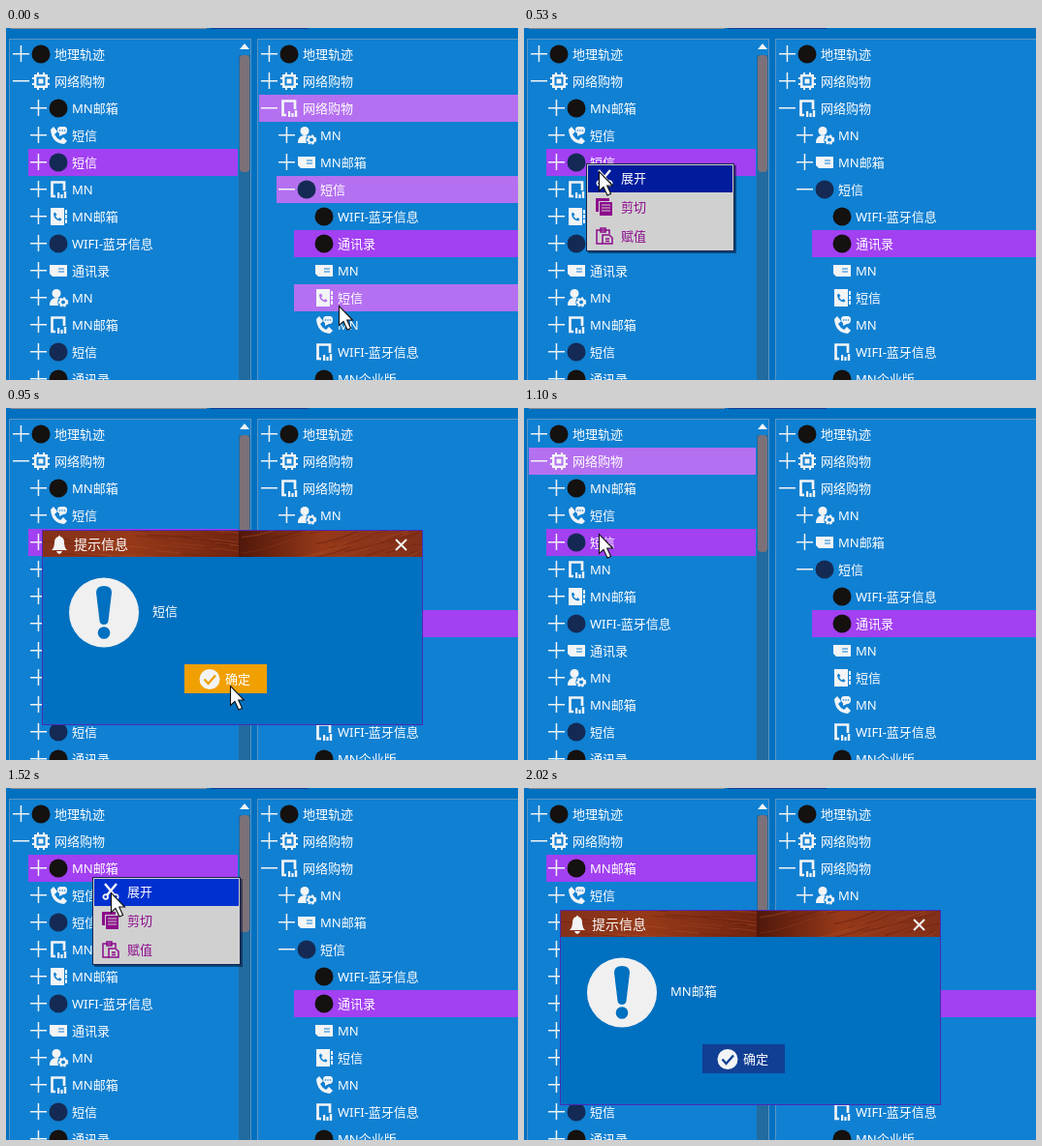
An HTML page with a canvas for the animation above (2140 ms loop, 528x364 px).

```html
<!DOCTYPE html>
<html lang="zh-CN">
<head>
<meta charset="utf-8">
<title>树形列表</title>
<style>
html, body { margin: 0; width: 528px; height: 364px; overflow: hidden; background: #0070c0; }
canvas { display: block; }
</style>
</head>
<body>
<canvas id="stage" width="528" height="364"></canvas>
<script>
const g = document.getElementById('stage').getContext('2d');
const LOOP = 2140;
const FONT = '"Noto Sans", "Noto Sans CJK SC", "Noto Sans CJK", sans-serif';
const HOVER = '#b470f0', PICKED = '#a240f2', WHITE = '#f2f4f6', BODY = '#0070c0', PANEL = '#1080d2';
const EDGE = '#5a94c4';

// Each row: depth, expander, icon, label
const leftRows = [
  [0, '+', 'black', '地理轨迹'], [0, '-', 'chip', '网络购物'],
  [1, '+', 'black', 'MN邮箱'], [1, '+', 'call', '短信'],
  [1, '+', 'navy', '短信'], [1, '+', 'screen', 'MN'],
  [1, '+', 'book', 'MN邮箱'], [1, '+', 'navy', 'WIFI-蓝牙信息'],
  [1, '+', 'card', '通讯录'], [1, '+', 'user', 'MN'],
  [1, '+', 'screen', 'MN邮箱'], [1, '+', 'navy', '短信'],
  [1, '+', 'black', '通讯录']
];
const rightRows = [
  [0, '+', 'black', '地理轨迹'], [0, '+', 'chip', '网络购物'],
  [0, '-', 'screen', '网络购物'], [1, '+', 'user', 'MN'],
  [1, '+', 'card', 'MN邮箱'], [1, '-', 'navy', '短信'],
  [2, '', 'black', 'WIFI-蓝牙信息'], [2, '', 'black', '通讯录'],
  [2, '', 'card', 'MN'], [2, '', 'book', '短信'],
  [2, '', 'call', 'MN'], [2, '', 'screen', 'WIFI-蓝牙信息'],
  [2, '', 'black', 'MN企业版']
];

// t: start, at: pointer tip, pick: selected left row
const steps = [
  { t: 0, at: [343, 287], pick: 4 },
  { t: 100, at: [302, 262], pick: 4 },
  { t: 200, at: [192, 204], pick: 4 },
  { t: 300, at: [92, 152], pick: 4 },
  { t: 400, at: [64, 140], pick: 4 },
  { t: 430, at: [66, 142], pick: 4, menu: [64, 140, '#001c9c'] },
  { t: 530, at: [77, 148], pick: 4, menu: [64, 140, '#001c9c'] },
  { t: 630, at: [80, 152], pick: 4, menu: [64, 140, '#0030d0'] },
  { t: 700, at: [86, 160], pick: 4, dialog: '短信' },
  { t: 760, at: [165, 230], pick: 4, dialog: '短信' },
  { t: 830, at: [233, 289], pick: 4, dialog: '短信' },
  { t: 930, at: [231, 287], pick: 4, dialog: '短信' },
  { t: 1000, at: [206, 256], pick: 4 },
  { t: 1030, at: [130, 186], pick: 4 },
  { t: 1100, at: [77, 130], pick: 4 },
  { t: 1200, at: [84, 104], pick: 4 },
  { t: 1300, at: [89, 92], pick: 2 },
  { t: 1400, at: [93, 97], pick: 2, menu: [89, 92, '#0030d0'] },
  { t: 1520, at: [108, 108], pick: 2, menu: [89, 92, '#0030d0'] },
  { t: 1620, at: [109, 110], pick: 2, menu: [89, 92, '#0030d0'] },
  { t: 1720, at: [109, 110], pick: 2, dialog: 'MN邮箱' },
  { t: 2020, at: null, pick: 2, dialog: 'MN邮箱' }
];

function box(x, y, w, h, color) {
  g.fillStyle = color;
  g.fillRect(x, y, w, h);
}
function frame(x, y, w, h, color) {
  g.strokeStyle = color;
  g.lineWidth = 1;
  g.strokeRect(x + .5, y + .5, w - 1, h - 1);
}
function disc(x, y, r, color) {
  g.fillStyle = color;
  g.beginPath();
  g.arc(x, y, r, 0, 7);
  g.fill();
}
function fill(d, color) {
  g.fillStyle = color;
  g.fill(new Path2D(d));
}
function line(d, color, width) {
  g.strokeStyle = color;
  g.lineWidth = width;
  g.stroke(new Path2D(d));
}
function text(s, x, y, color = '#fff', size = 13) {
  g.font = size + 'px ' + FONT;
  g.fillStyle = color;
  g.fillText(s, x, y + 5);
}
function place(x, y, draw) {
  g.save();
  g.translate(x, y);
  draw();
  g.restore();
}
function inside(p, x, y, w, h) {
  return p && p[0] >= x && p[0] < x + w && p[1] >= y && p[1] < y + h;
}

const HANDSET = 'M-8-6L-5-9L-1-4L-4-1Q-2 3 2 5L5 2L9 6L6 9Q-7 8-8-6Z';
const icons = {
  black() { disc(0, 0, 9.5, '#15110f'); },
  navy() { disc(0, 0, 9.5, '#142a54'); },
  chip(bg) {
    line('M-3-9V9M3-9V9M-9-3H9M-9 3H9', WHITE, 2);
    box(-7, -7, 14, 14, WHITE);
    box(-4.5, -4.5, 9, 9, bg);
    box(-2.5, -2.5, 5, 5, WHITE);
  },
  call(bg) {
    fill(HANDSET, WHITE);
    fill('M2-9H6Q9-9 9-5.5Q9-1 5-1L1 1V-2Q-1-3-1-5.5Q-1-9 2-9Z', WHITE);
    for (const x of [1.5, 4, 6.5]) disc(x, -5, .8, bg);
  },
  screen() {
    line('M-3 7H-6.5V-7.5H6V1', WHITE, 2.7);
    box(-1, 3, 2.2, 6, WHITE);
    box(2.4, 5, 2.2, 4, WHITE);
    box(5.8, 2, 2.4, 7, WHITE);
  },
  book(bg) {
    box(-8, -9, 14, 18, WHITE);
    for (const y of [-7, -2, 3]) box(7, y, 2, 4, WHITE);
    g.scale(.5, .5);
    g.translate(-2, 0);
    fill(HANDSET, bg);
  },
  card(bg) {
    fill('M-9-6H9V6H-6L-9 3Z', WHITE);
    line('M0-2H6M0 1H6', bg, 1);
  },
  user(bg) {
    disc(-2, -4.5, 4.5, WHITE);
    fill('M-9 8Q-9 0-2 0Q2 0 4 3V8Z', WHITE);
    disc(5, 4.5, 5.8, bg);
    g.setLineDash([2, 1.7]);
    line('M9 4.5A4 4 0 1 1 1 4.5A4 4 0 1 1 9 4.5', WHITE, 2.4);
    g.setLineDash([]);
    line('M8 4.5A3 3 0 1 1 2 4.5A3 3 0 1 1 8 4.5', WHITE, 2);
  }
};

function tree(rows, x, right, picked, hovered) {
  const lit = new Set();
  for (let i = hovered, depth = 9; i >= 0; i--) {
    if (rows[i][0] < depth) { lit.add(i); depth = rows[i][0]; }
  }
  rows.forEach(([depth, sign, icon, label], i) => {
    const left = x + depth * 18, y = 27 + i * 28;
    const bg = i === picked ? PICKED : lit.has(i) ? HOVER : PANEL;
    if (bg !== PANEL) box(left, y - 14, right - left, 28, bg);
    if (sign) box(left + 2, y - 1, 17, 1.5, WHITE);
    if (sign === '+') box(left + 9.7, y - 9, 1.5, 17, WHITE);
    place(left + 31, y, () => icons[icon](bg));
    text(label, left + 45, y);
  });
}

function rowAt(p, rows, x, right) {
  if (!p) return -1;
  const i = Math.floor((p[1] - 13) / 28);
  return rows[i] && inside(p, x + rows[i][0] * 18, 13, right - x - rows[i][0] * 18, 364) ? i : -1;
}

function scrollbar() {
  box(240, 28, 12, 336, '#216b9f');
  fill('M246 16L251 22H241Z', WHITE);
  g.beginPath();
  g.roundRect(241, 28, 10, 121, 4);
  g.fillStyle = '#7c7178';
  g.fill();
}

function menu([x, y, color]) {
  const ink = '#8c0a8c', paper = '#d0d0d0';
  box(x + 2, y + 2, 153, 91, 'rgba(0,10,40,.5)');
  box(x, y, 153, 91, paper);
  frame(x, y, 153, 91, '#17244e');
  box(x + 2, y + 2, 149, 28, color);
  ['展开', '剪切', '赋值'].forEach((s, i) => text(s, x + 36, y + 15 + i * 30, i ? ink : '#fff'));
  place(x + 19, y + 15, () => {
    line('M-6-8L4 4M6-8L-4 4', WHITE, 2.5);
    line('M-3 5.5A2.3 2.3 0 1 1-7.6 5.5A2.3 2.3 0 1 1-3 5.5M7.6 5.5A2.3 2.3 0 1 1 3 5.5A2.3 2.3 0 1 1 7.6 5.5', WHITE, 1.8);
  });
  place(x + 19, y + 45, () => {
    box(-9, -9, 14, 14, ink);
    box(-6, -6, 15, 15, paper);
    box(-5, -5, 13, 14, ink);
    line('M-3-2H6M-3 1H6M-3 4H6', paper, 1);
  });
  place(x + 19, y + 75, () => {
    line('M-2 8H-8V-6H5V-2M-4-8H1V-4H-4Z', ink, 1.5);
    line('M-2-1H5L8 2V8H-2ZM1 3H5M1 5.5H5', ink, 1.5);
  });
}

function wood() {
  let seed = 11;
  const rnd = () => (seed = seed * 16807 % 2147483647) / 2147483647;
  const tones = ['#59190c', '#a64524', '#6d2110', '#b0522c'];
  g.save();
  g.beginPath();
  g.rect(38, 127, 391, 27);
  g.clip();
  for (const [x, w, tilt] of [[38, 202, -5], [240, 189, 18]]) {
    const shade = g.createLinearGradient(x, 0, x + w, 0);
    shade.addColorStop(0, tilt < 0 ? '#84301a' : '#4f170b');
    shade.addColorStop(.45, '#963919');
    shade.addColorStop(1, tilt < 0 ? '#702410' : '#82301a');
    box(x, 127, w, 27, shade);
    g.globalAlpha = .38;
    for (let i = 0; i < 34; i++) {
      const a = x + rnd() * w, y = 122 + rnd() * 36, n = 25 + rnd() * 40;
      const end = Math.min(a + n, x + w);
      line(`M${a} ${y}Q${a + n / 2} ${y - tilt * .2} ${end} ${y - tilt * n / 60}`, tones[i % 4], .8 + rnd());
    }
    g.globalAlpha = 1;
  }
  g.restore();
}

function dialog(message, pointer) {
  const button = inside(pointer, 184, 265, 85, 30) ? '#f0a000' : '#113f94';
  box(37, 126, 393, 202, BODY);
  wood();
  frame(37, 126, 393, 202, '#4a2bb8');
  place(55, 141, () => {
    fill('M-8 6Q-5 3-5-2Q-5-7-1-8Q0-11 1-8Q5-7 5-2Q5 3 8 6Z', WHITE);
    fill('M-3 7H3Q2 10 0 10Q-2 10-3 7Z', WHITE);
  });
  text('提示信息', 70, 141, '#fff', 14);
  line('M402 136L413 147M413 136L402 147', WHITE, 2);
  disc(101, 211.5, 36, '#f0f0f0');
  fill('M93 191Q93 184 101 184Q109 184 109 191L105.5 220Q105 224 101 224Q97 224 96.5 220Z', BODY);
  disc(101, 232.5, 6.3, BODY);
  text(message, 151, 210);
  box(184, 265, 85, 30, button);
  disc(210, 280.5, 10.5, WHITE);
  line('M204.5 280.5L208.5 285L216 276.5', button, 2.4);
  text('确定', 226, 280);
}

function pointerArrow([x, y]) {
  place(x, y, () => {
    const arrow = 'M.5.5V20.5L5 16.3L9 25L12.6 23.4L8.7 15H14.5Z';
    fill(arrow, '#fff');
    line(arrow, '#111', 1.1);
  });
}

function draw(time) {
  const s = steps.filter(k => k.t <= time).pop();
  const covered = s.menu || (s.dialog && inside(s.at, 37, 126, 393, 202));
  const p = covered ? null : s.at;
  box(0, 0, 528, 364, BODY);
  box(5, 0, 202, 1, '#8c8c90');
  box(211, 0, 101, 1, '#1a3c92');
  for (const [x, w] of [[3, 250], [259, 280]]) {
    box(x, 11, w, 360, PANEL);
    frame(x, 11, w, 360, EDGE);
  }
  tree(leftRows, 5, 239, s.pick, rowAt(p, leftRows, 5, 239));
  tree(rightRows, 261, 528, 7, rowAt(p, rightRows, 261, 528));
  scrollbar();
  if (s.menu) menu(s.menu);
  if (s.dialog) dialog(s.dialog, s.at);
  if (s.at) pointerArrow(s.at);
}

const start = performance.now();
function tick() {
  draw((performance.now() - start) % LOOP);
  requestAnimationFrame(tick);
}
tick();
</script>
</body>
</html>
```
